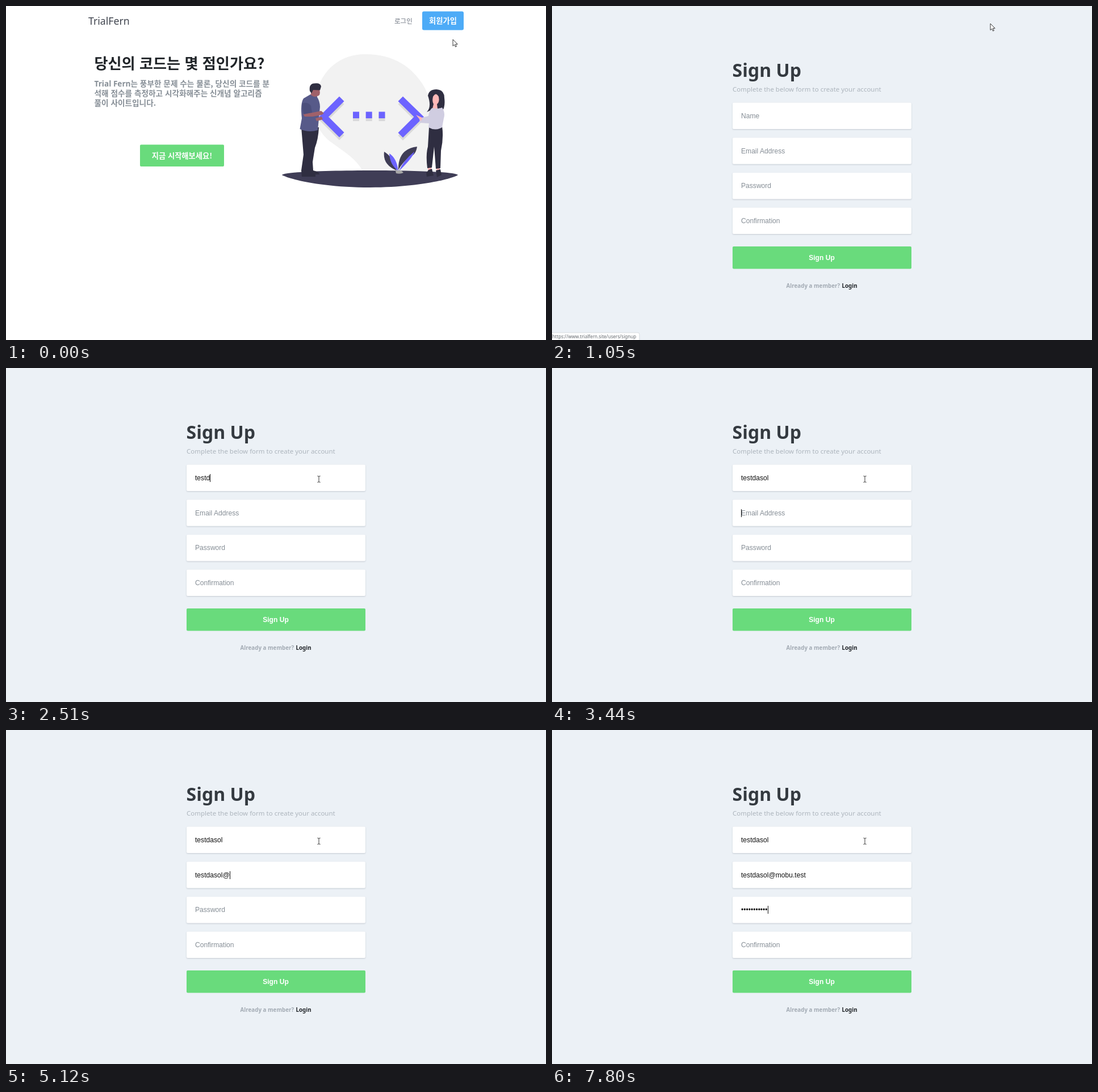
Animation, 951 px wide and 589 px high, one loop 8000 ms. Source, as an HTML page:

```html
<!DOCTYPE html>
<html lang="ko">
<head>
<meta charset="utf-8">
<title>Sign up</title>
<style>
html, body { margin: 0; width: 100%; height: 100%; overflow: hidden; background: #fff; }
svg { display: block; width: 951px; height: 589px; font-family: "Noto Sans", "Open Sans", sans-serif; }
.ko { font-family: "Noto Sans CJK KR", "Noto Sans KR", "Noto Sans CJK", sans-serif; font-weight: 700; }
.lat { font-family: "Noto Sans", sans-serif; }
.ui { font: 12.1px "Liberation Sans", Arial, sans-serif; }
.mid { text-anchor: middle; }
.box { filter: drop-shadow(0 1px 1px rgba(70, 85, 100, .25)); }
.skin { fill: #a0616a; }
.dark { fill: #2f2e41; }
.slate { fill: #3f3d56; }
.violet { fill: #6c63ff; }
.pale { fill: #ffb8b8; }
</style>
</head>
<body>
<svg viewBox="0 0 951 589">
  <g id="home">
    <rect width="951" height="589" fill="#fff"/>
    <text x="145" y="33" font-size="17.7" font-weight="300" fill="#40454f">TrialFern</text>
    <text class="ko" x="684" y="30.5" font-size="11.5" style="font-weight:500" fill="#6f7682">로그인</text>
    <rect id="join" x="733" y="9.5" width="73" height="33" rx="3"/>
    <text class="ko mid" x="769.5" y="31" font-size="13.3" fill="#fff">회원가입</text>

    <text class="ko" x="155.5" y="111" font-size="26.15" fill="#212529">당신의 코드는 몇 점인가요?</text>
    <g class="ko" font-size="13.65" fill="#868e96">
      <text x="155.5" y="142"><tspan class="lat" font-size="13.6">Trial Fern</tspan>는 풍부한 문제 수는 물론, 당신의 코드를 분</text>
      <text x="155.5" y="158.5">석해 점수를 측정하고 시각화해주는 신개념 알고리즘</text>
      <text x="155.5" y="175.5">풀이 사이트입니다.</text>
    </g>
    <rect x="236" y="244.5" width="148" height="38.5" rx="2" fill="#69db7c"/>
    <text class="ko mid" x="310" y="268.5" font-size="13.3" fill="#fff">지금 시작해보세요!</text>

    <!-- backdrop and ground -->
    <path fill="#f2f2f2" d="M629 292C616 268 592 255 571 239C546 220 539 190 546 157C556 111 590 85 632 85C684 85 715 108 735 140C756 175 759 243 742 292Z"/>
    <path class="slate" d="M486 298C490 293 555 290 641 290S792 293 796 298C782 306 722 320 641 320S500 306 486 298Z"/>

    <!-- brackets and dots over their shadows -->
    <g id="code">
      <path d="M587 159.500L551 195.500L587 231.500L595.500 223L568 195.500L595.500 168ZM699 159.500L736 195.500L699 232L690.500 223.500L718.500 195.500L690.500 168Z"/>
      <path d="M611 186.500h11v11.500h-11zM633.700 186.500h11v11.500h-11zM656.500 186.500h11v11.500h-11z"/>
    </g>

    <!-- man -->
    <path class="skin" d="M539 147L552 147Q555 158 548 159L546 167L535 161Z"/>
    <path class="dark" d="M535 150Q533 137 543 136.500Q554 135 555 142L553 148.500L541 148L538 154Z"/>
    <path class="dark" d="M520 214L551 214Q550 235 544 250L540 275L541 290Q552 293 552 297L545 297L545 301L521 301L520 290L524 262Z"/>
    <path fill="#575a89" d="M536 156Q543 162 547 159Q553 168 553 178L549 219Q533 224 517.500 217L521 198Q518 172 524 163Z"/>
    <path class="skin" d="M523 190L540 188L555 185L560 189L556 192L540 195L526 195ZM545 198L556 195L558 200L547 203Z"/>
    <path fill="#4c4f7c" d="M521 172Q531 168 537 176L539 188L524 191Z"/>

    <!-- woman -->
    <path class="dark" d="M743 158Q745 147 758 147Q772 148 772 162Q774 178 768 186L752 182L741 187Q750 178 743 158Z"/>
    <path class="pale" d="M752 160Q757 151 762 160Q764 170 759 173L760 181L751 181L753 173Q750 168 752 160Z"/>
    <path class="pale" d="M743 284h6v6h-6zM758 284h6v6h-6z"/>
    <path class="dark" d="M745 214L768 212Q771 232 766 255L765 286L757 287L754 248L750 285L742 286Q739 262 743 248Z"/>
    <path fill="#d0cde1" d="M750 180Q760 182 768 179Q774 188 771 198L768 214Q756 221 744 214L745 207L729 206L728 198L744 194Q745 185 750 180Z"/>
    <path class="pale" d="M722 192L733 197L731 203Z"/>
    <path class="dark" d="M740 295L744 289L750 287L753 299L741 301ZM757 290L765 288L767 298L759 302Z"/>

    <!-- plant -->
    <path class="slate" d="M688 290Q663 280 666 257Q682 266 688 290ZM691 289Q690 252 724 248Q722 262 712 266Q700 273 691 289Z"/>
    <path class="violet" d="M691 291Q676 280 675 260Q688 268 691 291ZM692 291Q700 272 719 257Q717 267 692 291Z"/>
    <path fill="#a8a8a8" d="M686 291Q694 287 700 294Q694 297 687 295Z"/>
  </g>

  <g id="form">
    <rect width="951" height="589" fill="#ecf1f6"/>
    <text x="317.500" y="125" font-size="32" font-weight="700" fill="#343a40">Sign Up</text>
    <text x="318" y="151" font-size="11.5" fill="#adb5bd">Complete the below form to create your account</text>
    <g id="fields"></g>
    <rect x="318" y="424" width="315" height="39.5" rx="2" fill="#69db7c"/>
    <text class="ui mid" x="475" y="447.500" style="font-weight:700" fill="#fff">Sign Up</text>
    <g font-size="9.8" font-weight="600">
      <text x="412.500" y="497" fill="#a3abb4">Already a member?</text>
      <text x="510.500" y="497" fill="#212529">Login</text>
    </g>
    <g id="hints" font-size="8.6" fill="#333">
      <rect class="box" x="318" y="219" width="130" height="83.5" rx="2" fill="#fff" stroke="#d5d9dd" stroke-width=".6"/>
      <text x="326" y="239.500">dasolim</text>
      <text x="326" y="264">dasolim1</text>
      <text x="326" y="288.500">dasol2</text>
    </g>
    <rect id="caret" width="1" height="14" fill="#111"/>
  </g>

  <g id="status">
    <path d="M-1 576H151Q154 576 154 579V590H-1Z" fill="#fff" stroke="#cfd3d7" stroke-width=".8"/>
    <text x="0.500" y="586" font-size="8.1" fill="#666b70">https://www.trialfern.site/users/signup</text>
  </g>

  <circle id="click" cx="772" cy="31" r="8" fill="#dfe93a" opacity=".75"/>
  <g id="pointer" fill="#fff" stroke="#222" stroke-width=".9" stroke-linejoin="round">
    <path id="arrow" d="M0 0V11.500L2.700 9.100L4.500 13.100L6.400 12.300L4.600 8.300H8.200Z"/>
    <path id="hand" d="M-1.500 0Q0-2 1.500 0V5L6 6Q8.500 7 8 10L6.500 15.500H0L-4 9.500Q-4 7-1.500 8.500ZM1.500 5V8M4 6V8.500"/>
    <path id="beam" fill="none" d="M-2.500-5.500Q0-5.500 0-4.500Q0-5.500 2.500-5.500M0-5V5M-2.500 5.500Q0 5.500 0 4.500Q0 5.500 2.500 5.500"/>
  </g>
</svg>
<script>
const LOOP = 8000, OPEN = 1050, FOCUS = 1600;
const el = id => document.getElementById(id);
const show = (id, on) => el(id).style.display = on ? '' : 'none';
const spread = (from, to, n) => Array.from({ length: n }, (_, i) => from + (to - from) * i / (n - 1));

function add(parent, tag, attrs) {
  const node = document.createElementNS('http://www.w3.org/2000/svg', tag);
  for (const key in attrs) node.setAttribute(key, attrs[key]);
  return parent.appendChild(node);
}

// bracket colours: shadow below, then the shape itself
const [shadow, face] = [el('code').cloneNode(true), el('code')];
shadow.removeAttribute('id');
shadow.setAttribute('transform', 'translate(0 5)');
shadow.setAttribute('fill', '#d9d9d9');
face.setAttribute('class', 'violet');
face.before(shadow);

const fields = [
  { hint: 'Name', value: 'testdasol', focus: FOCUS,
    keys: [...spread(1900, 2280, 4), ...spread(2510, 2840, 3), 3110, 3270] },
  { hint: 'Email Address', value: 'testdasol@mobu.test', focus: 3440,
    keys: [...spread(3710, 4560, 7), ...spread(4790, 5120, 3), ...spread(5270, 5700, 4), ...spread(5880, 6390, 5)] },
  { hint: 'Password', value: '•'.repeat(11), focus: 6660,
    keys: [...spread(6660, 7610, 11).slice(1), 7800] },
  { hint: 'Confirmation', value: '', focus: Infinity, keys: [] }
];
fields.forEach((field, i) => {
  field.y = 170.5 + i * 61.7;
  add(el('fields'), 'rect', { class: 'box', x: 318, y: field.y, width: 315, height: 46.5, rx: 2, fill: '#fff' });
  field.text = add(el('fields'), 'text', { class: 'ui', x: 333, y: field.y + 27.3 });
});

const path = [[260, 787, 59], [850, 772, 31], [1070, 772, 31], [1290, 631, 101], [FOCUS - 40, 551, 196]];
function pointerAt(t) {
  const next = path.findIndex(p => p[0] > t);
  if (next === 0) return path[0].slice(1);
  if (next < 0) return path[path.length - 1].slice(1);
  const [a, b] = [path[next - 1], path[next]];
  const k = (t - a[0]) / (b[0] - a[0]);
  return [a[1] + (b[1] - a[1]) * k, a[2] + (b[2] - a[2]) * k];
}

function drawFields(t) {
  let active = null;
  for (const field of fields) {
    const count = field.keys.filter(k => k <= t).length;
    field.text.textContent = count ? field.value.slice(0, count) : field.hint;
    field.text.setAttribute('fill', count ? '#111' : '#868e96');
    if (t >= field.focus) active = { field, count };
  }
  show('caret', active);
  if (!active) return;
  const width = active.count ? active.field.text.getComputedTextLength() : 0;
  el('caret').setAttribute('x', Math.round(333 + width));
  el('caret').setAttribute('y', Math.round(active.field.y + 16.5));
}

function draw(t) {
  const [x, y] = pointerAt(t);
  const form = t >= OPEN;
  const hover = !form && y < 42.5;
  const beam = form && x > 318 && x < 633 && y > 170 && y < 217;
  show('home', !form);
  show('form', form);
  el('join').setAttribute('fill', hover ? '#74bffb' : '#4dabf7');
  show('status', hover || form && t < 1400);
  show('click', t >= 900 && !form);
  show('hints', t >= FOCUS + 60 && t < 1900);
  show('arrow', !hover && !beam);
  show('hand', hover);
  show('beam', beam);
  el('pointer').setAttribute('transform', `translate(${x} ${y})`);
  if (form) drawFields(t);
}

function tick() {
  draw(performance.now() % LOOP);
  requestAnimationFrame(tick);
}
tick();
</script>
</body>
</html>
```
